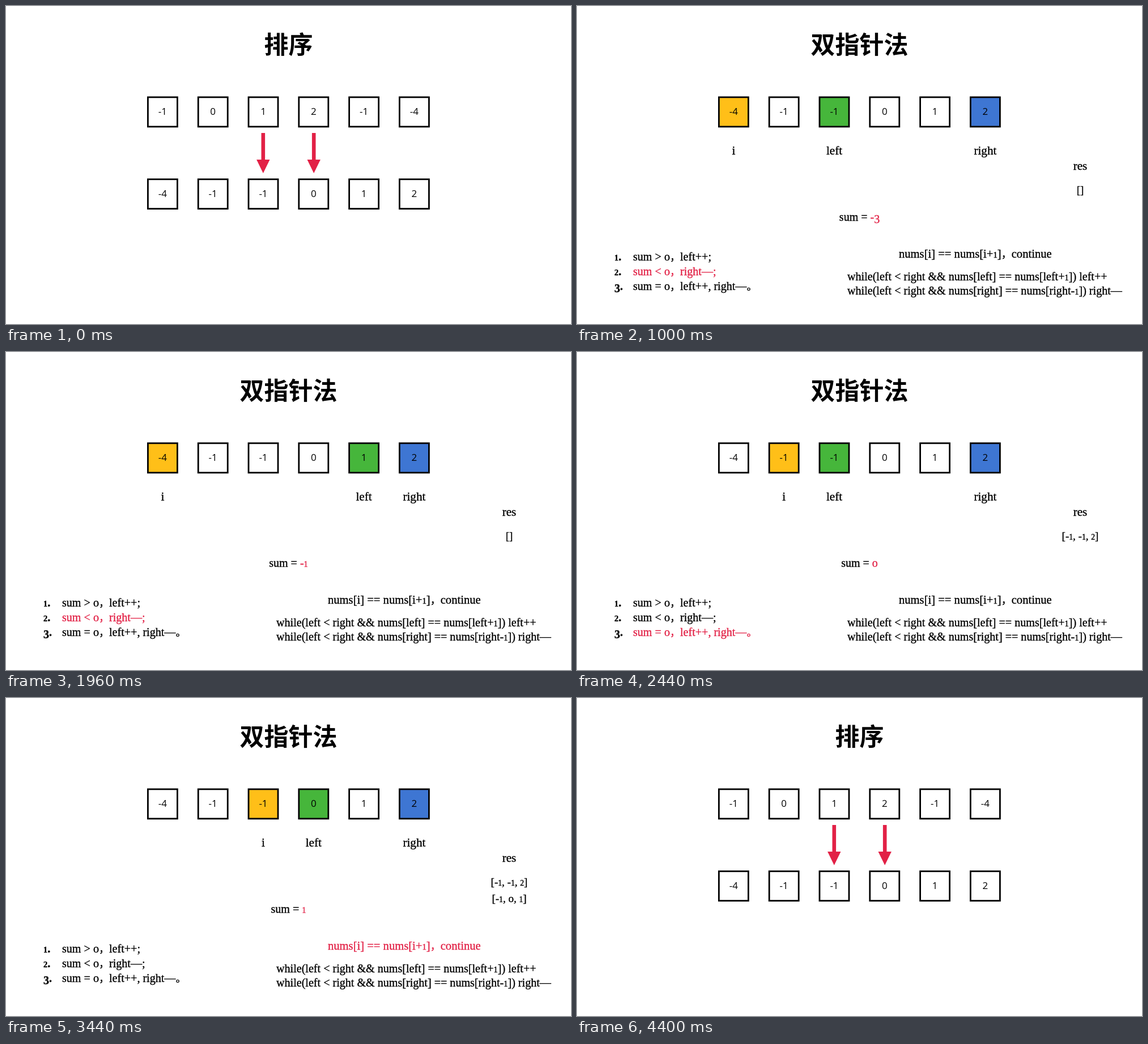
An HTML page for the animation above (4.44 s loop, 997x561 px).

```html
<!DOCTYPE html>
<html lang="zh">
<head>
<meta charset="utf-8">
<style>
html, body { margin: 0; width: 100%; height: 100%; overflow: hidden; background: #fff; }
svg { display: block; width: 100%; height: 100%; }
.serif { font-family: "Liberation Serif", "Noto Sans CJK SC", serif; stroke-width: .35; }
.num { font: 17px "Open Sans", "Noto Sans", sans-serif; text-anchor: middle; }
.title { font: 700 43px "Noto Sans CJK SC", "Noto Sans CJK", sans-serif; text-anchor: middle; }
</style>
</head>
<body>
<svg id="stage" viewBox="0 0 997 561"></svg>
<script>
const LOOP = 4440;
const RED = '#e22146', YELLOW = '#ffbf18', GREEN = '#46b63b', BLUE = '#3e76d3';
const input = [-1, 0, 1, 2, -1, -4];
const nums = [...input].sort((a, b) => a - b);

// Each step: start time, then the pointers i, left, right
const steps = [
  { at: 0 },
  { at: 520, ptr: [0, 1, 5], res: 0 },
  { at: 1000, ptr: [0, 2, 5], res: 0 },
  { at: 1480, ptr: [0, 3, 5], res: 0 },
  { at: 1960, ptr: [0, 4, 5], res: 0 },
  { at: 2440, ptr: [1, 2, 5], res: 1 },
  { at: 2960, ptr: [1, 3, 4], res: 2 },
  { at: 3440, ptr: [2, 3, 5], res: 2, skip: true },
  { at: 3920, ptr: [3, 4, 5], res: 2 },
  { at: 4400 }
];
const found = ['[-1, -1, 2]', '[-1, 0, 1]'];
const rules = ['sum > 0，left++;', 'sum < 0，right—;', 'sum = 0，left++, right—。'];

const stage = document.getElementById('stage');
const cellX = k => 276.4 + 88.8 * k;
const escape = s => s.replace(/&/g, '&amp;').replace(/</g, '&lt;').replace(/>/g, '&gt;');

// Old-style figures and slightly smaller full-width punctuation
const glyphs = s => escape(s)
  .replace(/[12]/g, '<tspan font-size=".72em">$&</tspan>')
  .replace(/3/g, '<tspan baseline-shift="-4">3</tspan>')
  .replace(/0/g, 'o')
  .replace(/[，。]/g, '<tspan font-size="18">$&</tspan>');

const text = (x, y, s, { size = 20.1, color = '#000', anchor = 'start', weight = 400 } = {}) =>
  `<text class="serif" x="${x}" y="${y}" font-size="${size}" font-weight="${weight}" ` +
  `text-anchor="${anchor}" fill="${color}" stroke="${color}">${glyphs(s)}</text>`;

const centered = (x, y, s, size) => text(x, y, s, { size, anchor: 'middle' });

const title = s => `<text class="title" x="498.5" y="83.5">${s}</text>`;

const row = (values, cy, fills = {}) => values.map((v, k) =>
  `<rect x="${cellX(k) - 26}" y="${cy - 26}" width="52" height="52" ` +
  `fill="${fills[k] || '#fff'}" stroke="#000" stroke-width="2.8"/>` +
  `<text class="num" x="${cellX(k)}" y="${cy + 5.2}">${v}</text>`).join('');

const arrow = x =>
  `<path fill="${RED}" d="M${x - 3.3} 224h6.6v47h8.4l-11.7 24l-11.7 -24h8.4z"/>`;

const sortScene = () => title('排序') + row(input, 186.9) + arrow(453.8) + arrow(543.2) + row(nums, 331.7);

function pointerScene({ ptr, res, skip }) {
  const [i, left, right] = ptr;
  const sum = nums[i] + nums[left] + nums[right];
  const active = skip ? -1 : sum > 0 ? 0 : sum < 0 ? 1 : 2;
  const lines = res ? found.slice(0, res) : ['[]'];
  return title('双指针法') +
    row(nums, 186.9, { [i]: YELLOW, [left]: GREEN, [right]: BLUE }) +
    ['i', 'left', 'right'].map((name, k) => centered(cellX(ptr[k]), 261.5, name, 21.2)).join('') +
    centered(888, 289, 'res', 21.2) +
    lines.map((s, k) => centered(888, 331 + 29 * k, s, 19)).join('') +
    `<text class="serif" x="498.5" y="379" font-size="20" text-anchor="middle" stroke="#000">sum = ` +
    `<tspan fill="${RED}" stroke="${RED}">${glyphs(String(sum))}</tspan></text>` +
    rules.map((s, k) => {
      const y = 449 + 26 * k;
      return text(66, y, `${k + 1}.`, { weight: 700 }) +
        text(99, y, s, { color: k === active ? RED : '#000' });
    }).join('') +
    text(568, 443.5, 'nums[i] == nums[i+1]，continue', { size: 20.6, color: skip ? RED : '#000' }) +
    text(477, 483.5, 'while(left < right && nums[left] == nums[left+1]) left++') +
    text(477, 509, 'while(left < right && nums[right] == nums[right-1]) right—');
}

let shown = null;
function draw(ms) {
  const t = ms % LOOP;
  const step = steps.filter(s => s.at <= t).pop();
  if (step === shown) return;
  shown = step;
  stage.innerHTML = step.ptr ? pointerScene(step) : sortScene();
}

const start = performance.now();
function tick() {
  draw(performance.now() - start);
  requestAnimationFrame(tick);
}
tick();
</script>
</body>
</html>
```
